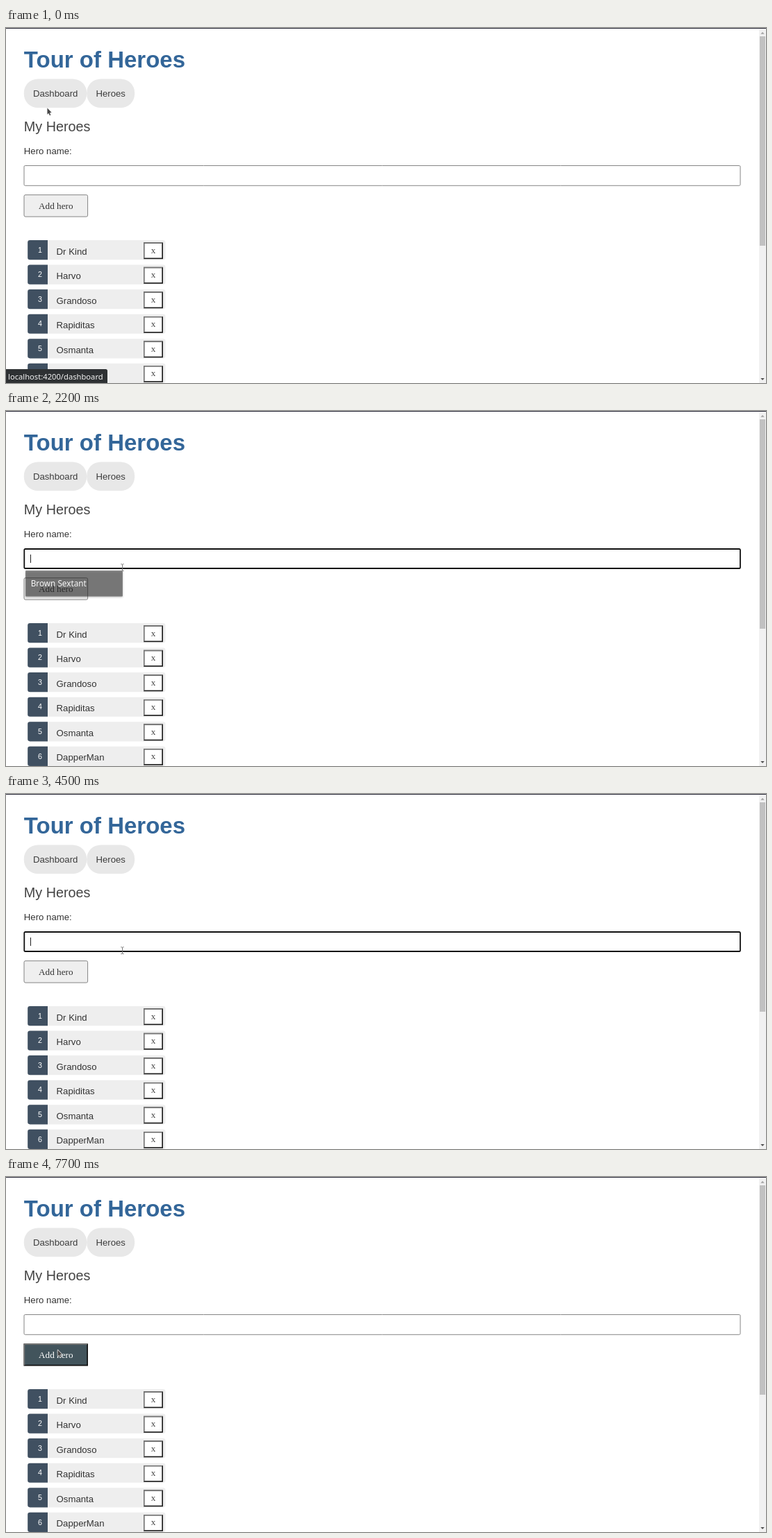
These frames come from a looping animation (1094 px wide and 512 px high, 8000 ms). An HTML page with a canvas:

```html
<!DOCTYPE html>
<html lang="en">
<head>
<meta charset="utf-8">
<title>Tour of Heroes</title>
<style>
  html, body { margin: 0; width: 100%; height: 100%; overflow: hidden; background: #fff; }
  canvas { display: block; }
</style>
</head>
<body>
<canvas id="stage" width="1094" height="512"></canvas>
<script>
const ctx = document.getElementById('stage').getContext('2d');
const LOOP = 8000;
const SANS = '"Liberation Sans", Arial, sans-serif';
const SERIF = '"Liberation Serif", "Times New Roman", serif';
const UI = '"Noto Sans", sans-serif';
const HEROES = ['Dr Kind', 'Harvo', 'Grandoso', 'Rapiditas', 'Osmanta', 'DapperMan'];

// Every track holds [start time, ...values]; a value stays until the next entry.
const pointerTrack = [
  [0, 'arrow', 59, 115], [300, 'arrow', 60, 117], [400, 'arrow', 66, 116], [500, 'hand', 72, 110],
  [600, 'hand', 74, 108], [1000, 'arrow', 92, 142], [1100, 'arrow', 128, 205],
  [1200, 'arrow', 160, 255], [1400, 'arrow', 169, 236], [1500, 'ibeam', 171, 224],
  [1600, 'ibeam', 169, 225], [1700, 'ibeam', 167.5, 225.5], [7100, 'arrow', 150, 234],
  [7200, 'arrow', 125, 243], [7300, 'arrow', 98, 248], [7400, 'arrow', 77, 249], [7500, 'arrow', 74, 249]
];
const statusTrack = [
  [0, 1], [200, .45], [300, 0], [600, .43], [700, 1], [1400, .45], [1500, 0]
];
const popupTrack = [[0, 0], [2200, .5], [2300, 1], [2400, .43], [2500, 0]];
const focusTrack = [[0, 'none'], [1500, 'hover'], [1600, 'focus'], [7500, 'none']];
const dashTrack = [[0, false], [500, true], [1000, false]];
const buttonTrack = [[0, 'idle'], [7300, 'hover'], [7500, 'pressed'], [7700, 'hover']];
const typingTrack = [
  [0, '', false], [1600, '', true], [2400, 'D', true], [2500, 'Dr', true], [2900, 'Dr ', true],
  [3100, 'Dr P', true], [3200, 'Dr Pe', true], [3300, 'Dr Pea', true], [3900, 'Dr Pea', false],
  [4200, 'Dr ', false], [4500, '', true], [5100, '', false], [5400, 'E', true],
  [5600, 'Ea', true], [5700, 'Eage', true], [5800, 'Eager', true], [6100, 'EagerM', true],
  [6300, 'EagerMan', true], [7000, 'EagerMan', false], [7700, '', false]
];

function at(track, time) {
  let found = track[0];
  for (const entry of track) if (entry[0] <= time) found = entry;
  return found.slice(1);
}

function text(string, x, y, size, color, family = SANS, align = 'left', weight = '') {
  ctx.font = `${weight} ${size}px ${family}`;
  ctx.fillStyle = color;
  ctx.textAlign = align;
  ctx.fillText(string, x, y);
}

function box(x, y, w, h, fill, radius = 0) {
  ctx.beginPath();
  ctx.roundRect(x, y, w, h, radius);
  ctx.fillStyle = fill;
  ctx.fill();
}

function outline(x, y, w, h, color, width, radius) {
  ctx.beginPath();
  ctx.roundRect(x, y, w, h, radius);
  ctx.strokeStyle = color;
  ctx.lineWidth = width;
  ctx.stroke();
}

function polygon(points, fill, stroke) {
  ctx.beginPath();
  points.forEach(([x, y]) => ctx.lineTo(x, y));
  ctx.closePath();
  if (stroke) {
    ctx.strokeStyle = stroke;
    ctx.lineWidth = 1.4;
    ctx.lineJoin = 'round';
    ctx.stroke();
  }
  ctx.fillStyle = fill;
  ctx.fill();
}

function bevel(x, y, w, h, fill, light, dark, edge = 1.65) {
  box(x, y, w, h, dark);
  polygon([[x, y], [x + w, y], [x + w - edge, y + edge], [x + edge, y + h - edge], [x, y + h]], light);
  box(x + edge, y + edge, w - 2 * edge, h - 2 * edge, fill);
}

function drawHeader(hovered) {
  text('Tour of Heroes', 25.8, 57, 33, '#336699', SANS, 'left', 'bold');
  box(25.8, 73.4, 90.4, 41.6, hovered ? '#42545c' : '#e8e8e8', 20);
  text('Dashboard', 38.9, 98.6, 13.2, hovered ? '#fff' : '#3d3d3d');
  box(116.2, 73.4, 69, 41.6, '#e8e8e8', 20);
  text('Heroes', 129.4, 98.6, 13.2, '#3d3d3d');
  text('My Heroes', 25.8, 149, 19.8, '#444');
  text('Hero name:', 25.8, 182, 13.2, '#333');
}

function drawInput(state, value, caret) {
  if (state === 'focus') outline(26.3, 199, 1030.6, 28, '#101010', 1.8, 1.6);
  else if (state === 'hover') outline(26, 198.7, 1031, 28.6, '#8a8a8a', 1.6, 1.6);
  else outline(26, 198.5, 1031, 28.8, '#858585', 1, 1.6);
  text(value, 33.9, 216.3, 11, '#000');
  if (caret) box(Math.floor(33.9 + ctx.measureText(value).width + .15) + (value ? 0 : 1), 207, 1, 12, '#222');
}

function drawButton(state) {
  if (state === 'idle') {
    box(25.8, 240.5, 92, 31.8, '#efefef', 2);
    outline(26, 240.7, 91.6, 31.4, '#858585', 1, 2);
  } else {
    const edges = ['#767676', '#111'];
    if (state === 'pressed') edges.reverse();
    bevel(25.5, 240.3, 92.5, 32.2, '#42545c', ...edges);
  }
  text('Add hero', 47.1, 261.2, 13.2, state === 'idle' ? '#333' : '#fff', SERIF);
}

function drawHero(name, i) {
  const y = 306 + i * 35.55;
  box(31.2, y, 198.3, 28.2, '#eee', 3.3);
  box(31.2, y, 28.8, 28.2, '#405061', [3.3, 0, 0, 3.3]);
  text(i + 1, 52, y + 17.8, 10.7, '#fff', SANS, 'right');
  text(name, 72.6, y + 20.7, 13.2, '#333');
  bevel(198, y + 3.3, 28, 23.9, '#fff', '#767676', '#1a1a1a');
  text('x', 212, y + 18.7, 13.2, '#444', SERIF, 'center');
}

function drawScrollbar() {
  box(1084, 1, 10, 511, '#f1f1f1');
  box(1085, 12, 8, 302, '#c1c1c1');
  polygon([[1086.3, 8.7], [1089, 5.8], [1091.7, 8.7]], '#a3a3a3');
  polygon([[1086.3, 505], [1089, 508], [1091.7, 505]], '#505050');
}

function drawPopup(alpha) {
  if (!alpha) return;
  ctx.save();
  ctx.globalAlpha = alpha;
  ctx.shadowColor = 'rgba(0,0,0,.5)';
  ctx.shadowBlur = 3;
  ctx.shadowOffsetY = 1;
  box(28, 230, 140, 37.5, '#2f2f2f', 1);
  ctx.shadowColor = 'transparent';
  ctx.globalAlpha = Math.min(1, alpha * 1.9);
  text('Brown Sextant', 35.7, 253.2, 11.75, '#fff', UI);
  ctx.restore();
}

function drawStatus(alpha) {
  if (!alpha) return;
  ctx.save();
  ctx.globalAlpha = alpha;
  box(0, 492, 146, 20, '#2e3133', [0, 2.5, 0, 0]);
  ctx.globalAlpha = Math.min(1, alpha * 1.6);
  text('localhost:4200/dashboard', 3, 507, 11.2, '#f4f4f4', UI);
  ctx.restore();
}

const pointers = {
  arrow() {
    polygon([[.5, .5], [.5, 9.4], [2.4, 7.7], [3.9, 11], [5.3, 10.4], [3.9, 7.2], [6.4, 6.8]],
      '#454545', '#e9e9e9');
  },
  hand() {
    polygon([[-1.7, .8], [-.6, 0], [.5, .8], [.7, 4.2], [3.7, 4.8], [5, 6], [4.9, 9.4],
      [3.9, 13], [-1.5, 13], [-4.6, 8.6], [-4, 7.3], [-1.7, 8.4]], '#3c3c3c', '#d8dcde');
  },
  ibeam() {
    box(-.5, -4.5, 1, 9.5, '#777');
    box(-2.3, -5.2, 1.9, 1, '#888');
    box(.4, -5.2, 1.9, 1, '#888');
    box(-2.3, 4.5, 1.9, 1, '#888');
    box(.4, 4.5, 1.9, 1, '#888');
  }
};

function drawPointer(kind, x, y) {
  ctx.save();
  ctx.translate(x, y);
  pointers[kind]();
  ctx.restore();
}

function render() {
  const time = performance.now() % LOOP;
  box(0, 0, 1094, 512, '#fff');
  drawHeader(at(dashTrack, time)[0]);
  drawInput(at(focusTrack, time)[0], ...at(typingTrack, time));
  drawButton(at(buttonTrack, time)[0]);
  HEROES.forEach(drawHero);
  drawScrollbar();
  box(0, 0, 1094, 1, '#2c2c3a');
  drawPopup(at(popupTrack, time)[0]);
  drawStatus(at(statusTrack, time)[0]);
  drawPointer(...at(pointerTrack, time));
  requestAnimationFrame(render);
}
render();
</script>
</body>
</html>
```
